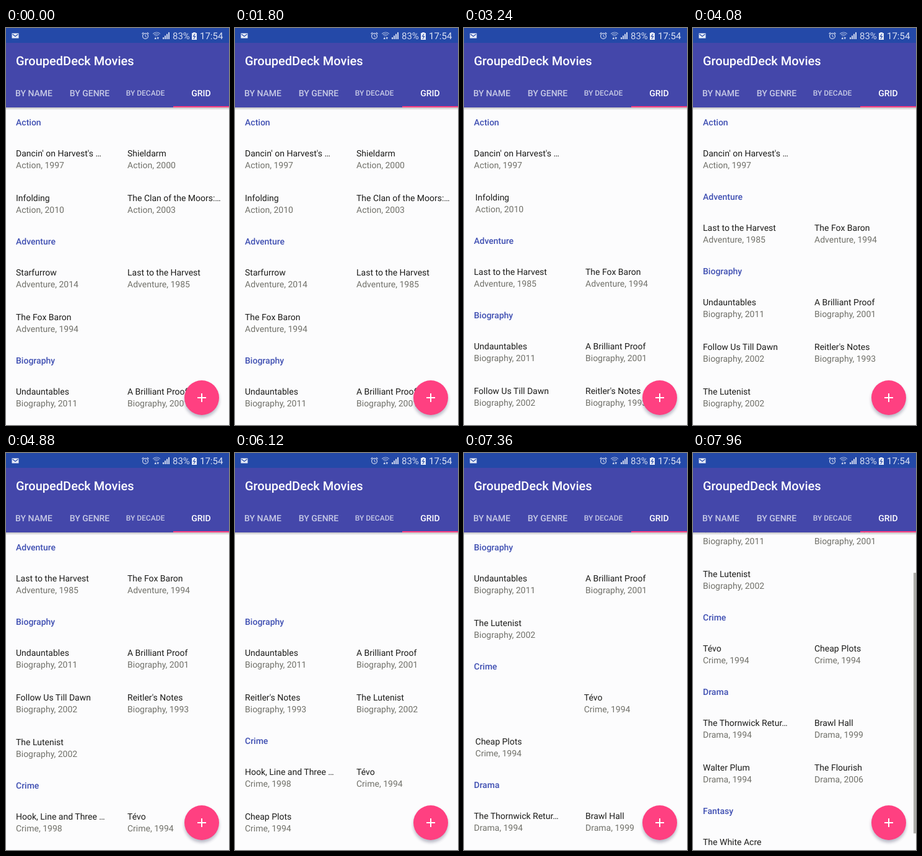
Write an HTML page with a canvas that moves like this. It is 360 px wide and 640 px high and loops after 8000 ms.

```html
<!DOCTYPE html>
<html lang="en">
<head>
<meta charset="utf-8">
<title>Movie grid</title>
<style>
html, body { margin: 0; width: 100%; height: 100%; overflow: hidden; background: #fcfcfd; }
canvas { display: block; width: 360px; height: 640px; }
</style>
</head>
<body>
<canvas id="stage"></canvas>
<script>
const W = 360, H = 640, LOOP = 8000;
const LIST_TOP = 128, HEADER_H = 48, ROW_H = 72, COL_W = 180;
const FADE = 120, MOVE = 250;
const FONT = 'Roboto, "Noto Sans", sans-serif';
const ACCENT = '#ff4081', STATUS = '#2449a8';

const canvas = document.getElementById('stage');
const ctx = canvas.getContext('2d');
const ratio = window.devicePixelRatio || 1;
canvas.width = W * ratio;
canvas.height = H * ratio;
ctx.textRendering = 'geometricPrecision';

const sections = [
  ['Action', [["Dancin' on Harvest's …", 1997], ['Shieldarm', 2000], ['Infolding', 2010], ['The Clan of the Moors:…', 2003]]],
  ['Adventure', [['Starfurrow', 2014], ['Last to the Harvest', 1985], ['The Fox Baron', 1994]]],
  ['Biography', [['Undauntables', 2011], ['A Brilliant Proof', 2001], ['Follow Us Till Dawn', 2002], ["Reitler's Notes", 1993], ['The Lutenist', 2002]]],
  ['Crime', [['Hook, Line and Three …', 1998], ['Tévo', 1994], ['Cheap Plots', 1994]]],
  ['Drama', [['The Thornwick Retur…', 1994], ['Brawl Hall', 1999], ['Walter Plum', 1994], ['The Flourish', 2006]]],
  ['Fantasy', [['The White Acre', 1999]]]
];

// Each removal: start time, section index, item index.
const removals = [
  [1900, 0, 3], [2180, 1, 0], [3103, 0, 1], [3670, 0, 2], [4180, 0, 0],
  [4890, 1, 2], [5420, 2, 2], [5996, 1, 1], [6660, 2, 3], [7223, 3, 0]
];

const SCROLL_START = 7710, SCROLL_REF = 7960, SCROLL_DIST = 79;

const ease = p => (1 - Math.cos(Math.PI * Math.min(1, Math.max(0, p)))) / 2;
const mix = (a, b, p) => a + (b - a) * p;
const key = (s, i) => s + ':' + i;

function layout(gone) {
  const cells = new Map();
  let y = LIST_TOP;
  sections.forEach(([name, items], s) => {
    const alive = items.map((_, i) => i).filter(i => !gone.has(key(s, i)));
    if (!alive.length) return;
    cells.set(key(s, 'head'), { head: true, title: name, x: 0, y });
    y += HEADER_H;
    alive.forEach((i, n) => {
      const [title, year] = items[i];
      cells.set(key(s, i), {
        title, sub: name + ', ' + year,
        x: (n % 2) * COL_W,
        y: y + Math.floor(n / 2) * ROW_H
      });
    });
    y += Math.ceil(alive.length / 2) * ROW_H;
  });
  return { cells, height: y - LIST_TOP };
}

const gone = new Set();
const layouts = [layout(gone)];
for (const [, s, i] of removals) {
  gone.add(key(s, i));
  layouts.push(layout(gone));
}

function text(str, x, y, size, color, weight = 400, align = 'left') {
  ctx.font = `${weight} ${size}px ${FONT}`;
  ctx.fillStyle = color;
  ctx.textAlign = align;
  ctx.fillText(str, x, y);
}

function rect(x, y, w, h, color) {
  ctx.fillStyle = color;
  ctx.fillRect(x, y, w, h);
}

function path(points) {
  ctx.beginPath();
  points.forEach(([x, y], i) => i ? ctx.lineTo(x, y) : ctx.moveTo(x, y));
}

function line(points, color, width) {
  ctx.strokeStyle = color;
  ctx.lineWidth = width;
  path(points);
  ctx.stroke();
}

function shape(points, color) {
  ctx.fillStyle = color;
  path(points);
  ctx.fill();
}

function arc(x, y, r, from, to, color, width) {
  ctx.strokeStyle = color;
  ctx.lineWidth = width;
  ctx.beginPath();
  ctx.arc(x, y, r, from, to);
  ctx.stroke();
}

function drawCell(cell, x, y, alpha) {
  if (alpha <= 0 || y > H || y < LIST_TOP - ROW_H) return;
  ctx.globalAlpha = alpha;
  if (cell.head) {
    text(cell.title, x + 16, y + 29, 14, '#3f4fb2', 500);
  } else {
    text(cell.title, x + 16, y + 31, 14, '#1c1c1a');
    text(cell.sub, x + 16, y + 50, 14, '#71716a');
  }
  ctx.globalAlpha = 1;
}

function drawList(t) {
  let step = 0;
  while (step < removals.length && t >= removals[step][0]) step++;
  const to = layouts[step];
  const from = layouts[Math.max(0, step - 1)];
  const since = step ? t - removals[step - 1][0] : 0;
  const fade = ease(since / FADE);
  const move = ease((since - FADE) / MOVE);
  const scroll = t > SCROLL_START
    ? SCROLL_DIST * Math.pow((t - SCROLL_START) / (SCROLL_REF - SCROLL_START), 1.3) : 0;

  from.cells.forEach((a, id) => {
    const b = to.cells.get(id);
    if (b) drawCell(a, mix(a.x, b.x, move), mix(a.y, b.y, move) - scroll, 1);
    else drawCell(a, a.x, a.y - scroll, 1 - fade);
  });

  if (scroll > 0) {
    const view = H - LIST_TOP, k = view / to.height;
    rect(356, LIST_TOP + scroll * k, 4, view * k, '#adada9');
  }
}

function drawStatus() {
  const ink = '#d3daf0', faint = '#a3b3dc';
  rect(0, 0, W, 24, STATUS);

  rect(9.5, 8.5, 11, 8, '#e6ebf7');
  line([[10.5, 10], [15, 13.5], [19.5, 10]], STATUS, 1.2);

  arc(225, 13, 4.4, 0, Math.PI * 2, ink, 1.2);
  line([[225, 10.5], [225, 13.5], [227, 14.5]], ink, 1);
  line([[219.5, 9.5], [222, 7.2]], ink, 1.2);
  line([[230.5, 9.5], [228, 7.2]], ink, 1.2);

  for (const r of [3, 5.5, 8]) {
    arc(243, 15, r, -Math.PI * 0.76, -Math.PI * 0.24, faint, 1.2);
  }
  shape([[239.5, 18], [241.2, 14.5], [243, 18]], ink);
  shape([[243.5, 15], [247, 15], [245.2, 18.5]], ink);

  for (let i = 0; i < 4; i++) {
    const h = 3 + i * 2.7;
    rect(253 + i * 3, 18 - h, 2, h, ink);
  }

  text('83%', 269, 18, 15, ink);
  rect(300, 8, 8, 11, '#e6ebf7');
  rect(302, 7, 4, 1, '#e6ebf7');
  line([[305, 9.5], [302.5, 13.5], [305.5, 13.5], [303, 17.5]], STATUS, 1.1);
  text('17:54', 313, 18, 15, '#dfe5f5');
}

function drawBar() {
  const shade = ctx.createLinearGradient(0, LIST_TOP, 0, LIST_TOP + 4);
  shade.addColorStop(0, 'rgba(0,0,0,.24)');
  shade.addColorStop(1, 'rgba(0,0,0,.02)');
  rect(0, LIST_TOP, W, 4, shade);
  rect(0, 24, W, LIST_TOP - 24, '#4447aa');
  text('GroupedDeck Movies', 16, 60, 20, '#fff', 500);

  const dim = '#c6c9e6';
  text('BY NAME', 45, 109.5, 14, dim, 500, 'center');
  text('BY GENRE', 135, 109.5, 14, dim, 500, 'center');
  text('BY DECADE', 225, 108.5, 12, dim, 500, 'center');
  text('GRID', 315, 109.5, 14, '#fff', 500, 'center');
  rect(270, 126, 90, 2, ACCENT);
}

function drawFab() {
  ctx.save();
  ctx.shadowColor = 'rgba(40,40,80,.32)';
  ctx.shadowBlur = 5 * ratio;
  ctx.shadowOffsetY = 4 * ratio;
  ctx.fillStyle = ACCENT;
  ctx.beginPath();
  ctx.arc(316, 596, 28, 0, Math.PI * 2);
  ctx.fill();
  ctx.restore();
  rect(309, 595, 14, 2, '#fff');
  rect(315, 589, 2, 14, '#fff');
}

function draw(t) {
  ctx.setTransform(ratio, 0, 0, ratio, 0, 0);
  rect(0, 0, W, H, '#fcfcfd');
  drawList(t);
  drawBar();
  drawStatus();
  drawFab();
}

const start = performance.now();
function tick() {
  draw((performance.now() - start) % LOOP);
  requestAnimationFrame(tick);
}
tick();
</script>
</body>
</html>
```
